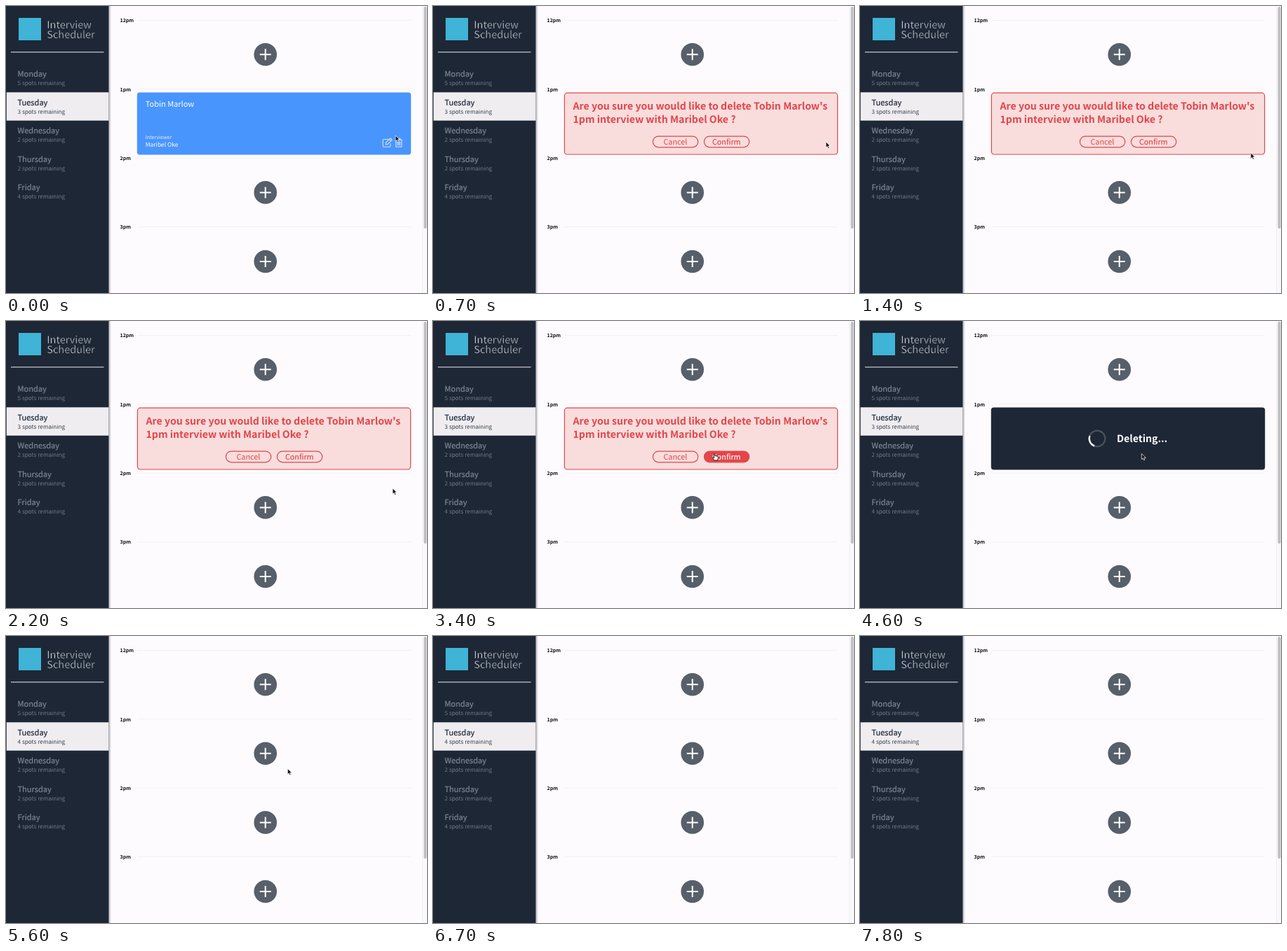
Recreate the animation shown at these times as an HTML page. Size 600 by 410 pixels, loop 7.9 s.

```html
<!DOCTYPE html>
<html lang="en">
<head>
<meta charset="utf-8">
<title>Interview Scheduler</title>
<style>
  html, body { margin: 0; width: 100%; height: 100%; overflow: hidden; background: #fdfbfe; }
  svg { display: block; width: 600px; height: 410px; }
  text {
    font-family: "Noto Sans CJK JP", "Noto Sans CJK SC", "Noto Sans CJK", "Noto Sans", sans-serif;
    text-rendering: geometricPrecision;
    white-space: pre;
  }
  .bold { font-weight: 700; }
</style>
</head>
<body>
<svg id="stage" viewBox="0 0 600 410" xmlns="http://www.w3.org/2000/svg"></svg>
<script>
const LOOP = 7900, STEP = 100;
const NAVY = '#1e2736', RED = '#e34549', BLUE = '#4995fe', PALE = '#efedf0';
const CONFIRM_AT = 700, DELETE_AT = 4500, EMPTY_AT = 5500, CURSOR_GONE_AT = 6300;
const GUEST = 'Tobin Marlow', HOST = 'Maribel Oke';
const stage = document.getElementById('stage');

function add(parent, tag, attrs = {}, content) {
  const node = document.createElementNS('http://www.w3.org/2000/svg', tag);
  for (const key in attrs) node.setAttribute(key, attrs[key]);
  if (content !== undefined) node.textContent = content;
  parent.appendChild(node);
  return node;
}
const group = (parent, attrs) => add(parent, 'g', attrs);
const rect = (parent, x, y, width, height, fill, extra) =>
  add(parent, 'rect', { x, y, width, height, fill, ...extra });
const path = (parent, d, extra) => add(parent, 'path', { d, fill: 'none', ...extra });
const label = (parent, x, y, size, fill, content, extra) =>
  add(parent, 'text', { x, y, 'font-size': size, fill, ...extra }, content);
const show = (node, visible) => node.setAttribute('display', visible ? 'inline' : 'none');

// An outline in the background colour thins glyphs; one in the text colour thickens them.
const outline = (stroke, width) => ({ stroke, 'stroke-width': width });

function buildSidebar() {
  const defs = add(stage, 'defs');
  const shade = add(defs, 'linearGradient', { id: 'shade' });
  add(shade, 'stop', { offset: 0, 'stop-color': '#70747c', 'stop-opacity': 0.6 });
  add(shade, 'stop', { offset: 1, 'stop-color': '#70747c', 'stop-opacity': 0 });
  rect(stage, 146, 0, 4, 410, 'url(#shade)');
  rect(stage, 0, 0, 146.4, 410, NAVY);

  rect(stage, 18, 17, 32, 32, '#3fb4d6');
  label(stage, 58.3, 31.6, 14.5, '#e4e6e9', 'Interview', outline(NAVY, 0.45));
  label(stage, 58.3, 46.4, 14.5, '#e4e6e9', 'Scheduler', outline(NAVY, 0.45));
  rect(stage, 7, 65.4, 132.5, 1, '#eeeef0');

  const spots = [5, 3, 2, 2, 4];
  return ['Monday', 'Tuesday', 'Wednesday', 'Thursday', 'Friday'].map((day, i) => {
    const y = 101.4 + 40.5 * i, selected = i === 1;
    if (selected) rect(stage, 0.8, 123.3, 145.6, 40.4, PALE);
    const color = selected ? NAVY : '#7d8894';
    label(stage, 16.5, y, 11.05, color, day, outline(color, 0.2));
    return label(stage, 16.5, y + 11.7, 8.2, color, spots[i] + ' spots remaining',
      outline(selected ? PALE : NAVY, 0.1));
  });
}

function addButton(parent, y) {
  const button = group(parent, { transform: `translate(369.7 ${y})` });
  add(button, 'circle', { r: 16.3, fill: '#575f6a' });
  path(button, 'M-8 0H8M0-8V8', { stroke: '#fff', 'stroke-width': 2 });
  return button;
}

function card(fill, border = 0, stroke = 'none') {
  const node = group(stage);
  rect(node, 186.8 + border / 2, 123.6 + border / 2, 390.4 - border, 89 - border, fill,
    { rx: 4, stroke, 'stroke-width': border });
  return node;
}

function buildSchedule() {
  ['12pm', '1pm', '2pm', '3pm'].forEach((hour, i) => {
    const y = 98.4 * i;
    label(stage, 162.5, 23.2 + y, 7, '#101010', hour, { class: 'bold' });
    rect(stage, 187, 20 + y, 390, 0.9, '#f1eff2');
    if (i !== 1) addButton(stage, 69.2 + 98.6 * i);
  });
  rect(stage, 593.5, 0, 6.5, 410, '#f9f8fa');
  rect(stage, 593.2, 0, 0.6, 410, '#eae9eb');
  rect(stage, 595.5, 1, 4, 317, '#bfbec0', { rx: 2 });
}

function buildBooking() {
  const node = card(BLUE);
  label(node, 198.7, 144.2, 11, '#fff', GUEST);
  label(node, 198.7, 190.4, 7.05, '#e6f0ff', 'Interviewer');
  label(node, 198.7, 200.5, 8.45, '#fff', HOST);
  const icons = group(node, { stroke: '#d3e4ff', 'stroke-width': 1.1, 'stroke-linejoin': 'round' });
  path(icons, 'M545 190.5H538.3Q537.2 190.5 537.2 191.6V200Q537.2 201.2 538.3 201.2H546.6Q547.8 201.2 547.8 200V196.5');
  path(icons, 'M541 198 541.6 195 547.8 188.8 550.2 191.2 544 197.4Z M546.3 190.4 548.7 192.8');
  path(icons, 'M554.6 191.2H565 M557.7 191V189.2H561.9V191 M555.8 191.4V201.3H563.9V191.4 M558.2 193.5V199.3 M559.85 193.5V199.3 M561.5 193.5V199.3');
  return node;
}

function pill(parent, x, textX, content) {
  const shape = rect(parent, x, 186.1, 64.3, 15.7, 'none', { rx: 7.85, stroke: RED, 'stroke-width': 1.2 });
  const caption = label(parent, textX, 197.8, 10.75, RED, content, { 'stroke-width': 0.15 });
  return hovered => {
    const color = hovered ? '#fff' : RED;
    shape.setAttribute('fill', hovered ? RED : 'none');
    caption.setAttribute('fill', color);
    caption.setAttribute('stroke', color);
  };
}

function buildConfirm() {
  const node = card('#f9dddd', 1.2, RED);
  const lines = [`Are you sure you would like to delete ${GUEST}'s`, `1pm interview with ${HOST} ?`];
  lines.forEach((line, i) => label(node, 199.5, 148.3 + 18.5 * i, 14.13, RED, line, { class: 'bold' }));
  pill(node, 313.4, 328.5, 'Cancel');
  return { node, setHover: pill(node, 386.4, 398, 'Confirm') };
}

function buildDeleting() {
  const node = card(NAVY);
  const spinner = group(node);
  add(spinner, 'circle', { r: 11.3, fill: 'none', stroke: '#4b535e', 'stroke-width': 2.2 });
  const corner = 11.3 * Math.SQRT1_2;
  path(spinner, `M${-corner} ${corner}A11.3 11.3 0 0 1 ${-corner} ${-corner}`, { stroke: '#fff', 'stroke-width': 2.2 });
  label(node, 366, 173.2, 14.1, '#fff', 'Deleting...', { class: 'bold' });
  return { node, spinner };
}

function buildCursor() {
  const node = group(stage, { 'stroke-linejoin': 'round' });
  const arrow = path(node, 'M0 0V8.2L1.9 6.5 3.2 9.4 4.7 8.7 3.4 5.9H6Z',
    { fill: '#111', stroke: '#fff', 'stroke-width': 0.7 });
  const hand = path(node,
    'M-.8 4.5V.7Q0-.4.8.7V3.2Q1.7 2.6 2.3 3.5 3.3 3 3.8 4 5 3.7 5 5V7Q4.6 8.5 4 9.6H-.6Q-1.4 8-3 5.9-2.6 4.6-.8 6Z',
    { fill: '#fff', stroke: '#111', 'stroke-width': 1 });
  return { node, arrow, hand };
}

const daySpots = buildSidebar();
buildSchedule();
const freeSlot = addButton(stage, 167.8);
const booking = buildBooking();
const confirm = buildConfirm();
const deleting = buildDeleting();
const cursor = buildCursor();

// Cursor stops as [time, x, y].
const stops = [
  [0, 555, 185], [400, 560, 194], [1000, 560, 194],
  [2000, 551, 239], [2400, 551, 239], [3200, 401.3, 189.5], [LOOP, 401.3, 189.5]
];

function cursorAt(t) {
  const i = stops.findIndex(stop => stop[0] > t);
  const [t0, x0, y0] = stops[i - 1], [t1, x1, y1] = stops[i];
  const p = (t - t0) / (t1 - t0), eased = p * p * (3 - 2 * p);
  return [x0 + (x1 - x0) * eased, y0 + (y1 - y0) * eased];
}

const inside = (x, y, left, top, right, bottom) => x >= left && x <= right && y >= top && y <= bottom;

function render(t) {
  const [x, y] = cursorAt(t);
  const asking = t >= CONFIRM_AT && t < DELETE_AT;
  const overTrash = t < CONFIRM_AT && inside(x, y, 555, 189, 565, 202);
  const overConfirm = asking && inside(x, y, 386, 186, 451, 202);

  show(booking, t < CONFIRM_AT);
  show(confirm.node, asking);
  show(deleting.node, t >= DELETE_AT && t < EMPTY_AT);
  show(freeSlot, t >= EMPTY_AT);
  confirm.setHover(overConfirm);
  deleting.spinner.setAttribute('transform', `translate(338 168) rotate(${(t - DELETE_AT) * 0.36 - 61})`);
  daySpots[1].textContent = (t < EMPTY_AT ? 3 : 4) + ' spots remaining';

  show(cursor.node, t < CURSOR_GONE_AT);
  show(cursor.arrow, !(overTrash || overConfirm));
  show(cursor.hand, overTrash || overConfirm);
  cursor.node.setAttribute('transform', `translate(${x} ${y})`);
}

// A small lead keeps timer jitter from holding back a step.
const start = performance.now() - 20;
function tick() {
  const elapsed = (performance.now() - start) % LOOP;
  render(Math.floor(elapsed / STEP) * STEP);
  requestAnimationFrame(tick);
}
tick();
</script>
</body>
</html>
```
